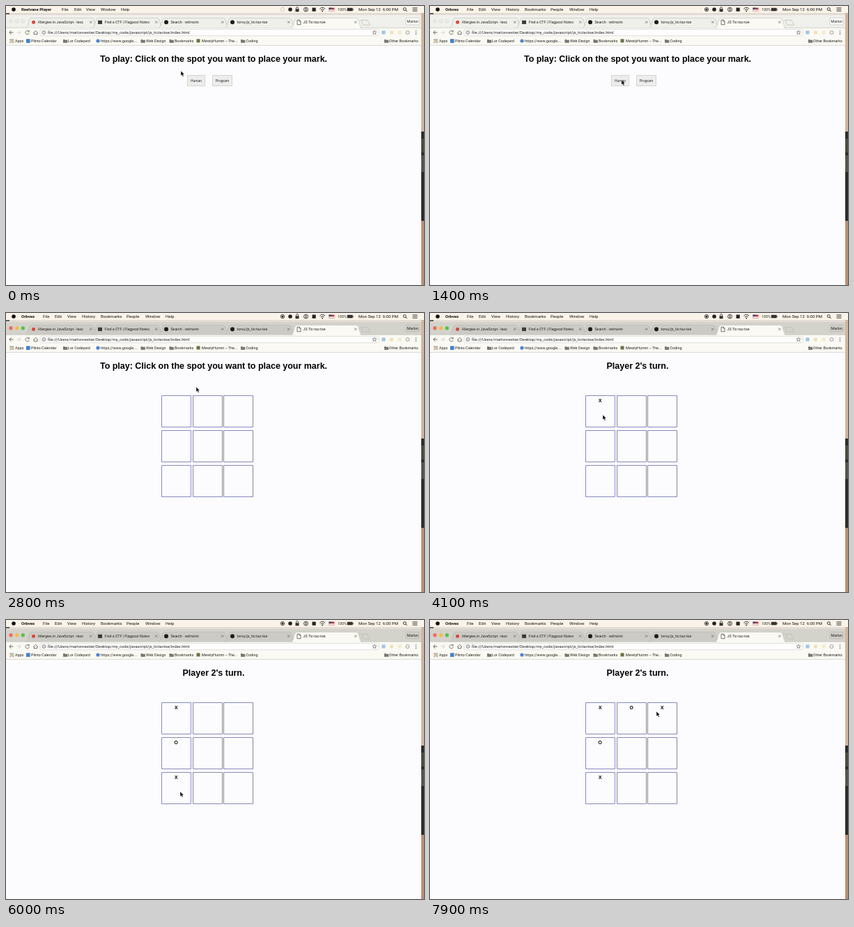
Write an HTML page that moves like this. It is 600x400 px and loops after 8 s.

```html
<!DOCTYPE html>
<html lang="en">
<head>
<meta charset="utf-8">
<title>Tic-tac-toe</title>
<style>
html, body { margin: 0; width: 100%; height: 100%; overflow: hidden; background: #fcfcfe; }
svg { display: block; width: 600px; height: 400px; }
text { font: 5.4px Roboto, "Open Sans", sans-serif; fill: #24241c; white-space: pre; }
.menu { font-size: 6px; fill: #111; }
.app { font-weight: 700; }
.tab { font-size: 5.25px; }
.url { font-size: 5.75px; }
.page { font: 5px "Liberation Sans", Arial, sans-serif; text-anchor: middle; fill: #222; }
.head { font-size: 12.47px; font-weight: 700; fill: #000; }
.mark { font-size: 6.8px; font-weight: 700; fill: #000; }
</style>
</head>
<body>
<svg id="stage" viewBox="0 0 600 400"></svg>
<script>
const LOOP = 8000, STEP = 100;
const INTRO = "To play: Click on the spot you want to place your mark.";
const BAR = "#faf9f3", EDGE = "#b9b9b4";
const IDLE = { strip: "#f0f0ec", tab: "#efefeb", profile: "#fdfdfa" };
const FOCUSED = { strip: "#d3d2cb", tab: "#cbcac4", profile: "#cccbc5" };

// Moments of change
const MENU_AT = 1300, FOCUS_AT = 1500, BOARD_AT = 2300;
const MOVES = [[3800, 0], [4900, 3], [5900, 6], [7000, 1], [7600, 2]];

// Pointer path: time, x, y
const PATH = [
  [0, 251, 93], [300, 251, 93], [1100, 275, 106], [2000, 275, 106], [2800, 273, 106],
  [3000, 273, 106], [3600, 247, 145], [4100, 248, 146], [4700, 251, 196], [5100, 251, 197],
  [5700, 250, 246], [6000, 250, 246], [6700, 295, 130], [7000, 295, 130], [7500, 325, 131], [8000, 325, 131]
];

const rect = (x, y, w, h, fill, extra = "") =>
  `<rect x="${x}" y="${y}" width="${w}" height="${h}" fill="${fill}" ${extra}/>`;
const dot = (x, y, r, fill, extra = "") => `<circle cx="${x}" cy="${y}" r="${r}" fill="${fill}" ${extra}/>`;
const line = (d, color = "#55554f", w = .8) =>
  `<path d="${d}" fill="none" stroke="${color}" stroke-width="${w}"/>`;
const text = (x, y, s, cls = "", extra = "") => `<text x="${x}" y="${y}" class="${cls}" ${extra}>${s}</text>`;
const group = (id, body) => `<g id="${id}">${body}</g>`;

function menu(app, items) {
  return text(22, 7.2, app, "menu app") + items.map(([x, s]) => text(x, 7.2, s, "menu")).join("");
}

function statusIcons() {
  return dot(397, 5, 2.7, "none", 'id="recorder" stroke="#222" stroke-width=".8"') +
    group("recording", dot(397, 5, 1.5, "#222")) +
    dot(408, 5, 2.8, "#222") +
    rect(415.5, 4.2, 5, 4, "#333") + line("M416.5 4.5V3a1.5 1.5 0 0 1 3 0V4.5", "#333") +
    dot(430.5, 5, 2.9, "none", 'stroke="#222" stroke-width=".9"') + line("M430.5 3.2V6.8", "#222", 1.1) +
    rect(439.5, 2.5, 5.2, 5.2, "#222") +
    line("M450.3 4q3.9-3.6 7.8 0M451.8 5.7q2.4-2.1 4.8 0", "#222", .9) + dot(454.2, 7.4, .9, "#222") +
    rect(463.5, 2.5, 8, 5, "#c43a36") + rect(463.5, 5, 8, 2.5, "#e8d8d0") + rect(463.5, 2.5, 4, 2.5, "#424c83") +
    text(476, 7, "100%", "", 'font-size="5"') +
    rect(490, 3, 7.4, 4, "#333", 'stroke="#333" stroke-width=".5"') + rect(498, 4.2, .8, 1.6, "#333") +
    text(506, 7.2, "Mon Sep 12  6:00 PM", "menu") +
    dot(572.3, 4.5, 2, "none", 'stroke="#222" stroke-width=".9"') + line("M573.8 6l2 2", "#222", .9) +
    line("M583.5 2.8h7M583.5 5h7M583.5 7.2h7", "#333", .9);
}

const tabShape = (x, end) => `M${x - 2} 31.2q2 0 3-3l2.4-8.2q1-2.7 3-2.7H${end - 5}q2 0 3 2.7l2.4 8.2q1 3 3 3`;

function tabs() {
  const list = [[30, 128, "Allergies in JavaScript - less"], [126, 222, "Find a CTF | Flagpost Notes"],
    [221, 317, "Search · velmorin"], [316, 412, "torvu/js_tic-tac-toe"], [411, 508, "JS Tic-tac-toe"]];
  return list.map(([x, end, title], i) => {
    const on = i === 4;
    return `<path class="${on ? "" : "backtab"}" d="${tabShape(x, end)}" fill="${on ? BAR : IDLE.tab}" stroke="${EDGE}" stroke-width=".6"/>` +
      text(x + 15.5, 25.3, title, "tab") +
      line(`M${end - 8} 21.5l3.4 3.4m0-3.4l-3.4 3.4`, "#66665f", .7);
  }).join("") +
    dot(39.5, 23.3, 2.5, "#d64a3d") + rect(132, 20.7, 6, 5.2, "#3b3b38") +
    dot(230, 23.3, 3, "#1d1d1d") + dot(325, 23.3, 3, "#1d1d1d") +
    line("M418 20h3l2 2v4.7h-5zM421 20v2h2") +
    line("M509.5 20.2h9.5l3.5 7h-9.5z", EDGE, .7);
}

function toolbar() {
  return line("M10.5 38H5M7.5 35.3L4.8 38l2.7 2.7", "#55554f", .9) +
    line("M15.5 38H21M18.5 35.3l2.7 2.7-2.7 2.7", "#d0d0cb", .9) +
    line("M32.7 36.3a2.7 2.7 0 1 0 .6 2.3M33.2 34.8v2h-2") +
    line("M39.2 38.4l3.3-3 3.3 3M40.2 38v2.7h4.6V38") +
    rect(49, 33.4, 486, 9.3, "#fdfdfe", 'rx="1.5" stroke="#cfcfca" stroke-width=".6"') +
    dot(54.3, 38, 2.4, "none", 'stroke="#55554f" stroke-width=".7"') + line("M54.3 37.6v1.8M54.3 36.3v.7", "#55554f", .7) +
    text(60, 40, "file:///Users/marlonvestier/Desktop/my_code/javascript/js_tictactoe/index.html", "url") +
    line("M529 35l.9 2h2.1l-1.7 1.4.7 2.2-2-1.3-2 1.3.7-2.2-1.7-1.4h2.1z", "#55554f", .6) +
    rect(539.5, 35.4, 5, 5, "#9cc4e6") + dot(553.5, 38, 2.6, "#f3dfb4") +
    rect(562.5, 35.5, 5, 5, "#f3eccb") + dot(576.5, 38, 2.5, "none", 'stroke="#77776f" stroke-width=".7"') +
    [35.6, 38, 40.4].map(y => dot(588.5, y, .7, "#55554f")).join("");
}

function bookmarks() {
  const folder = x => `<path d="M${x} 47.9h2.2l.7.8h3.4v4h-6.3z" fill="#77776f"/>`;
  const names = [[13, "Apps"], [36, "Plinto Calendar"], [89, "Lor Codeyard"], [136, "https://www.google...."],
    [201, "Web Design"], [242, "Bookmarks"], [281, "MerelyHumm -- The..."], [344.5, "Coding"], [550, "Other Bookmarks"]];
  const colors = ["#d8564a", "#54a564", "#5484cf", "#e0b94b"];
  let apps = "";
  for (let i = 0; i < 9; i++) apps += rect(5.5 + i % 3 * 2, 47.5 + (i / 3 | 0) * 2, 1.4, 1.4, colors[i % 4]);
  return apps + rect(29, 47.3, 5.6, 5.6, "#477fc8") + dot(132, 50, 2.6, "#4e83cc") + rect(273.5, 47.4, 5, 5, "#697344") +
    [82, 193.5, 234.5, 337, 543].map(folder).join("") +
    names.map(([x, s]) => text(x, 52, s)).join("");
}

function board() {
  let out = "";
  for (let i = 0; i < 9; i++) {
    const x = 223.5 + Math.round(i % 3 * 44.7), y = 118.5 + (i / 3 | 0) * 50;
    const side = i % 3 ? "#85858f" : "#8585d8";
    out += line(`M${x} ${y}h42M${x} ${y + 45}h42`, "#8989bd", 1) +
      line(`M${x} ${y}v45M${x + 42} ${y}v45`, side, 1) +
      text(x + 20.7, y + 9.2, "", "page mark", `id="cell${i}"`);
  }
  return out;
}

const button = (x, w, label) =>
  rect(x, 99.5, w, 15, "#ededee", 'stroke="#d6d6cd" stroke-width="1"') + text(x + w / 2, 108.8, label, "page");

const wallpaper = () =>
  rect(0, 0, 600, 400, "#d3b49e") + rect(596, 180, 4, 128, "#2b2c2a") + rect(596, 190, 4, 20, "#4a4d3c") +
  rect(596, 214, 4, 24, "#55534f") + rect(596, 308, 4, 92, "#b98f74") +
  rect(0, 10, 596, 3, "#e3dcd4") + rect(0, 10, 5, 2, "#625f58");

const stage = document.getElementById("stage");
stage.innerHTML =
  wallpaper() + rect(0, 0, 600, 10, "#faf3e9") + dot(11, 5, 2.8, "#111") +
  group("playerMenu", menu("Reelvane Player", [[80, "File"], [98, "Edit"], [115, "View"], [136, "Window"], [165, "Help"]])) +
  group("browserMenu", menu("Orbvex", [[53, "File"], [70, "Edit"], [88, "View"], [109, "History"],
    [136, "Bookmarks"], [173, "People"], [200, "Window"], [229, "Help"]])) +
  statusIcons() +
  rect(0, 13, 596, 18.5, IDLE.strip, 'id="strip"') +
  rect(0, 31, 596, 25, BAR) + line("M0 31.2H412M507 31.2H596", EDGE, .6) +
  ["#f06a58", "#f1bd42", "#55c150"].map((c, i) => dot(7 + i * 8.7, 21.7, 2.6, c, 'class="light" stroke-width=".5"')).join("") +
  tabs() +
  rect(574, 17, 19.5, 10, IDLE.profile, `id="profile" rx="1.2" stroke="${EDGE}" stroke-width=".6"`) +
  text(583.8, 23.9, "Marlon", "tab", 'text-anchor="middle"') +
  toolbar() + bookmarks() +
  rect(0, 56, 596, 344, "#fcfcfe") + line("M0 56.4H596", "#cbcbc5", .7) +
  text(298, 80.2, INTRO, "page head", 'id="heading"') +
  group("buttons", button(260.5, 25, "Human") + button(296.5, 28, "Program")) +
  group("board", board()) +
  '<path id="pointer" d="M0 0V7L1.6 5.6 2.8 8.2 4 7.6 2.9 5.1H5z" fill="#080808" stroke="#fff" stroke-width=".35"/>';

const el = id => document.getElementById(id);
const show = (id, on) => el(id).setAttribute("visibility", on ? "visible" : "hidden");
const fill = (node, color) => node.setAttribute("fill", color);
const lights = [...document.querySelectorAll(".light")].map(node => [node, node.getAttribute("fill")]);
const backTabs = document.querySelectorAll(".backtab");

function pointerAt(t) {
  const i = PATH.findIndex(p => p[0] > t), a = PATH[i - 1], b = PATH[i];
  const u = (t - a[0]) / (b[0] - a[0]), k = u * u * (3 - 2 * u);
  return [a[1] + (b[1] - a[1]) * k, a[2] + (b[2] - a[2]) * k];
}

function draw(t) {
  const focused = t >= FOCUS_AT, theme = focused ? FOCUSED : IDLE;
  show("playerMenu", t < MENU_AT);
  show("browserMenu", t >= MENU_AT);
  show("recording", t >= MENU_AT);
  el("recorder").setAttribute("stroke", t < MENU_AT ? "#c9c4bb" : "#222");
  show("buttons", t < BOARD_AT);
  show("board", t >= BOARD_AT);
  fill(el("strip"), theme.strip);
  fill(el("profile"), theme.profile);
  backTabs.forEach(node => fill(node, theme.tab));
  lights.forEach(([node, color]) => {
    fill(node, focused ? color : "#ebebe7");
    node.setAttribute("stroke", focused ? "none" : "#d3d3ce");
  });
  let turns = 0;
  MOVES.forEach(([at, cell], i) => {
    const played = t >= at;
    turns += played;
    el("cell" + cell).textContent = played ? "XO"[i % 2] : "";
  });
  el("heading").textContent = turns ? `Player ${turns % 2 + 1}'s turn.` : INTRO;
  el("pointer").setAttribute("transform", `translate(${pointerAt(t)})`);
}

const start = performance.now();
function tick() {
  const t = (performance.now() - start) % LOOP;
  draw(Math.floor(t / STEP) * STEP);
  requestAnimationFrame(tick);
}
tick();
</script>
</body>
</html>
```
